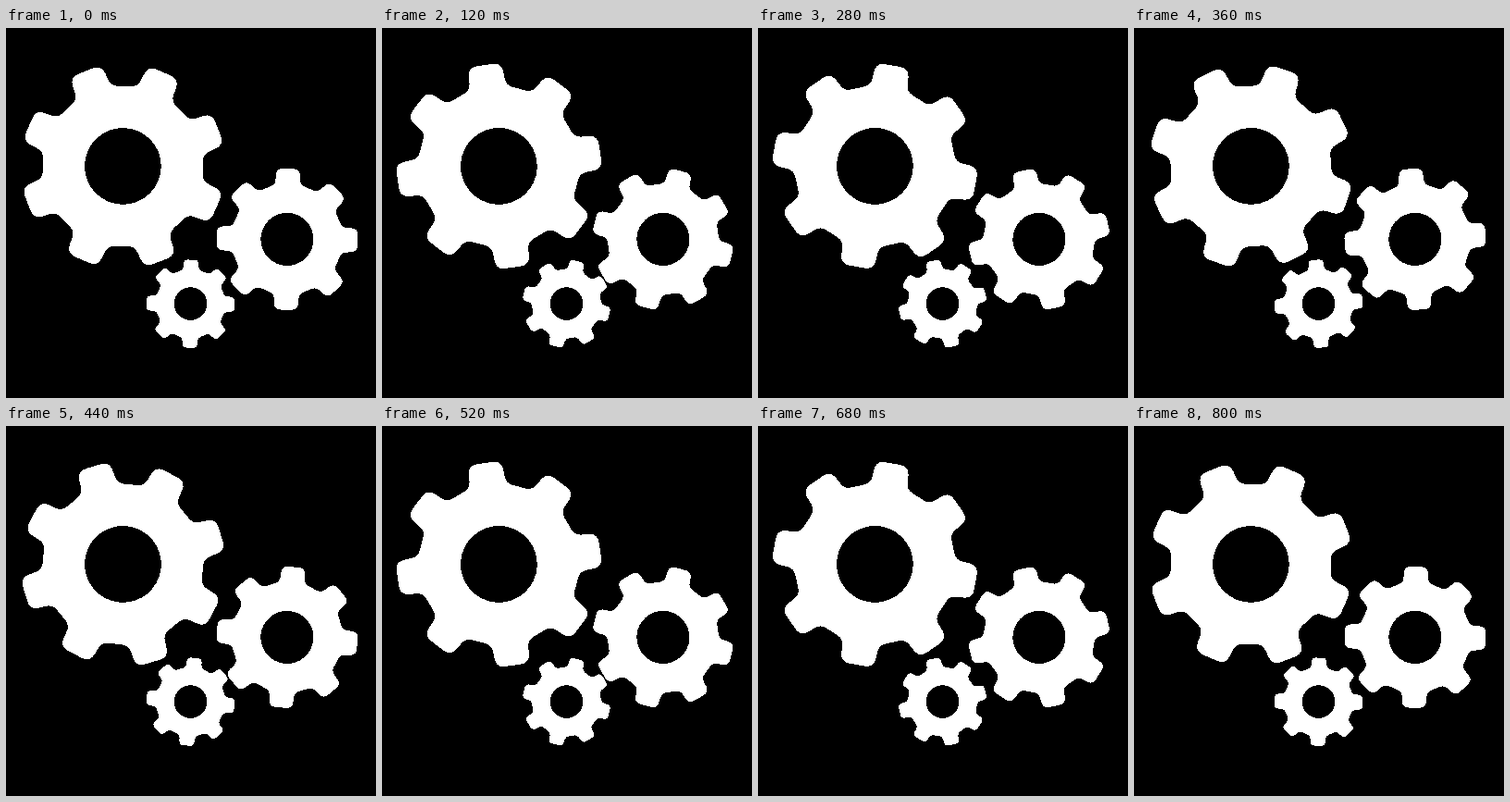
An HTML page for the animation above (840 ms loop, 400 by 400 pixels).

```html
<!DOCTYPE html>
<html>
<head>
<meta charset="utf-8">
<title>Turning gears</title>
<style>
  html, body { margin: 0; width: 100%; height: 100%; overflow: hidden; background: #000; }
  svg { display: block; }
</style>
</head>
<body>
<svg id="stage" width="400" height="400" viewBox="0 0 400 400" fill="#fff" fill-rule="evenodd" shape-rendering="crispEdges"></svg>
<script>
const TEETH = 8, HOLE = 37.3;
const STEP_MS = 40, STEPS = 21, STEP_DEG = 4.5;

// Corners of one upright tooth on a gear of radius 100: x, y, rounding
const TOOTH = [
  [-17.8, -77, 6.5],
  [-16.4, -99.5, 9],
  [16.4, -99.5, 9],
  [17.8, -77, 6.5]
];

// Centre, radius and resting angle in degrees
const GEARS = [
  { x: 126.4, y: 149.4, r: 111, phase: 23.6 },
  { x: 303.9, y: 228.4, r: 76.6, phase: 0.8 },
  { x: 199.5, y: 298.1, r: 47.8, phase: 0.8 }
];

// Point at the given distance from a towards b
function toward([ax, ay], [bx, by], distance) {
  const k = distance / Math.hypot(bx - ax, by - ay);
  return [ax + (bx - ax) * k, ay + (by - ay) * k];
}

function gearPath() {
  const corners = [];
  for (let i = 0; i < TEETH; i++) {
    const a = i * 2 * Math.PI / TEETH, c = Math.cos(a), s = Math.sin(a);
    for (const [x, y, r] of TOOTH) corners.push([x * c - y * s, x * s + y * c, r]);
  }
  const n = corners.length;
  const outline = corners.map((corner, i) => {
    const [x, y, r] = corner;
    const start = toward(corner, corners[(i + n - 1) % n], r);
    const end = toward(corner, corners[(i + 1) % n], r);
    return `${i ? 'L' : 'M'}${start}Q${x},${y} ${end}`;
  });
  const half = `a${HOLE},${HOLE} 0 0 1 `;
  return `${outline.join('')}ZM${-HOLE},0${half}${2 * HOLE},0${half}${-2 * HOLE},0Z`;
}

const outline = gearPath();
for (const gear of GEARS) {
  gear.node = document.createElementNS('http://www.w3.org/2000/svg', 'path');
  gear.node.setAttribute('d', outline);
  document.getElementById('stage').append(gear.node);
}

function draw() {
  const step = Math.floor(performance.now() / STEP_MS) % STEPS;
  for (const { x, y, r, phase, node } of GEARS) {
    const angle = phase + step * STEP_DEG;
    node.setAttribute('transform', `translate(${x} ${y}) rotate(${angle}) scale(${r / 100})`);
  }
  requestAnimationFrame(draw);
}
draw();
</script>
</body>
</html>
```
